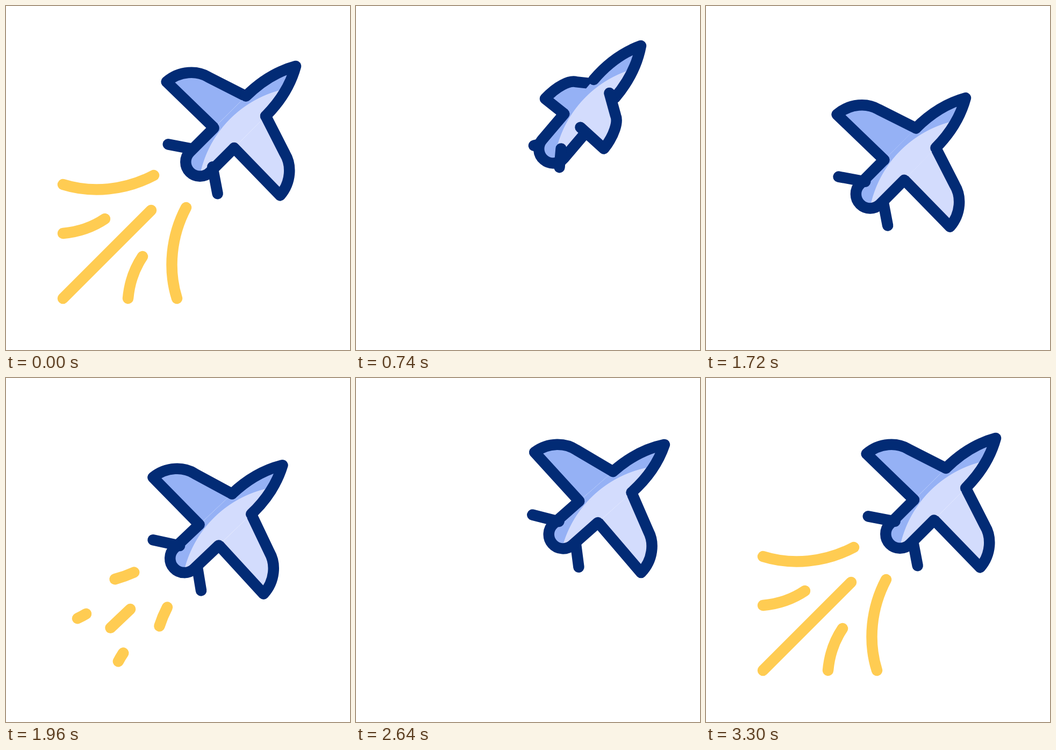
Write an HTML page that moves like this. It is 640 px wide and 640 px high and loops after 3.48 s.

```html
<!DOCTYPE html>
<html lang="en">
<head>
<meta charset="utf-8">
<title>Rolling plane</title>
<style>
  html, body { margin: 0; width: 100%; height: 100%; overflow: hidden; background: #fff; }
  svg { display: block; width: 100%; height: 100%; }
  .line { fill: none; stroke-width: 20.5; stroke-linecap: round; stroke-linejoin: round; }
  .navy { stroke: #022b75; }
  .trail { stroke: #ffcc52; }
  .skin { fill: url(#tone); }
</style>
</head>
<body>
<svg viewBox="0 0 640 640">
  <defs>
    <radialGradient id="tone" gradientUnits="userSpaceOnUse" cx="-155.6" cy="189" r="412">
      <stop offset=".499" stop-color="#d3dcfd"/>
      <stop offset=".501" stop-color="#95b1f5"/>
    </radialGradient>
  </defs>
  <g id="scene">
    <g id="trails"></g>
    <!-- local frame: origin at the nose, x along the fuselage -->
    <g transform="translate(539 112) rotate(-45)">
      <g id="back"></g>
      <path class="skin" d="M0 0C-35 -20 -70 -26 -105 -26L-252 -26.5A26.5 26.5 0 0 0 -252 26.5L-105 26C-70 26 -35 20 0 0Z"/>
      <path class="line navy" d="M-105 -26C-70 -26 -35 -20 0 0C-35 20 -70 26 -105 26"/>
      <path class="line navy" d="M-189 -26.5L-252 -26.5A26.5 26.5 0 0 0 -252 26.5L-189 26.5"/>
      <g id="front"></g>
    </g>
  </g>
</svg>
<script>
const LOOP = 3480;
const byId = id => document.getElementById(id);

function addPath(parent, attrs) {
  const path = document.createElementNS("http://www.w3.org/2000/svg", "path");
  for (const name in attrs) path.setAttribute(name, attrs[name]);
  return parent.appendChild(path);
}

const mirror = "matrix(0 -1 -1 0 650 650)";
const curves = ["M106 332C160 349 222 343 275 315", "M106 423Q150 419 184 396"];
const trails = [
  ...curves.map(d => ({ d })),
  { d: "M106 544L270 380" },
  ...curves.map(d => ({ d, transform: mirror }))
].map(attrs => addPath(byId("trails"), { ...attrs, class: "line trail", pathLength: 1 }));

const makeSide = id => ({
  wing: addPath(byId(id), { class: "line navy", style: "fill:url(#tone)" }),
  fin: addPath(byId(id), { class: "line navy" })
});
const back = makeSide("back");
const front = makeSide("front");

// time, x, y, rotation in degrees
const flight = [
  [220, 0, 0, 0],
  [740, 8.4, -21.1, -4.6],
  [860, 9, -25, -5.4],
  [960, 5.5, -22, -5.8],
  [1240, -20.5, 6, -4.1],
  [1300, -26.7, 14, -3.6],
  [1720, -55.3, 59.8, -0.2],
  [1780, -56, 60.6, 0],
  [1990, -24.3, 40.9, 1.8],
  [2200, 23.3, 11.2, 4.5],
  [2340, 31, 5.6, 5],
  [2640, 22.7, -1.8, 3.5],
  [2760, 16.5, -5.5, 2.6],
  [2920, 7, -4.5, 1.2],
  [3260, 0, 0, 0]
];

function ease(t, from, to) {
  const p = Math.min(1, Math.max(0, (t - from) / (to - from)));
  return p * p * (3 - 2 * p);
}

const slope = (i, c) => (flight[i + 1][c] - flight[i][c]) / (flight[i + 1][0] - flight[i][0]);

function tangent(i, c) {
  if (i === 0 || i === flight.length - 1) return 0;
  const a = slope(i - 1, c), b = slope(i, c);
  return a * b <= 0 ? 0 : 2 * a * b / (a + b);
}

// monotone cubic interpolation of one column
function sample(t, c) {
  const last = flight.length - 1;
  if (t <= flight[0][0]) return flight[0][c];
  if (t >= flight[last][0]) return flight[last][c];
  const i = flight.findIndex(key => key[0] > t) - 1;
  const span = flight[i + 1][0] - flight[i][0];
  const p = (t - flight[i][0]) / span, q = 1 - p;
  const e = p * p * (3 - 2 * p);
  return flight[i][c] * (1 - e) + flight[i + 1][c] * e
    + span * p * q * (q * tangent(i, c) - p * tangent(i + 1, c));
}

function drawSide(side, s) {
  const at = (x, y) => `${x} ${(y * s).toFixed(2)} `;
  side.wing.setAttribute("d", "M" + at(-105, 26) + "L" + at(-129.4, 101.1)
    + "C" + at(-135, 124) + at(-158, 147) + at(-190.5, 149.5) + "L" + at(-188.5, 26.5));
  side.fin.setAttribute("d", "M" + at(-242, 23) + "L" + at(-270.5, 65));
}

// visible part of the trails, as fractions counted from the far end
function trailRange(t) {
  if (t < 1000) return [0, 1 - ease(t, 220, 700)];
  if (t < 2600) return [1 - ease(t, 1800, 2280), 1 - ease(t, 1900, 2380)];
  return [1 - ease(t, 2820, 3300), 1];
}

function render(t) {
  const [x, y, angle] = [1, 2, 3].map(c => sample(t, c).toFixed(3));
  byId("scene").setAttribute("transform", `translate(${x} ${y}) rotate(${angle} 320 320)`);

  const roll = 1 - 2 * ease(t, 220, 1780);
  drawSide(back, -roll);
  drawSide(front, roll);

  const [start, end] = trailRange(t);
  const length = end - start;
  for (const trail of trails) {
    trail.style.display = length > 0.0005 ? "" : "none";
    trail.setAttribute("stroke-dasharray", `${length} 3`);
    trail.setAttribute("stroke-dashoffset", -start);
  }
}

function tick() {
  render(performance.now() % LOOP);
  requestAnimationFrame(tick);
}
tick();
</script>
</body>
</html>
```
